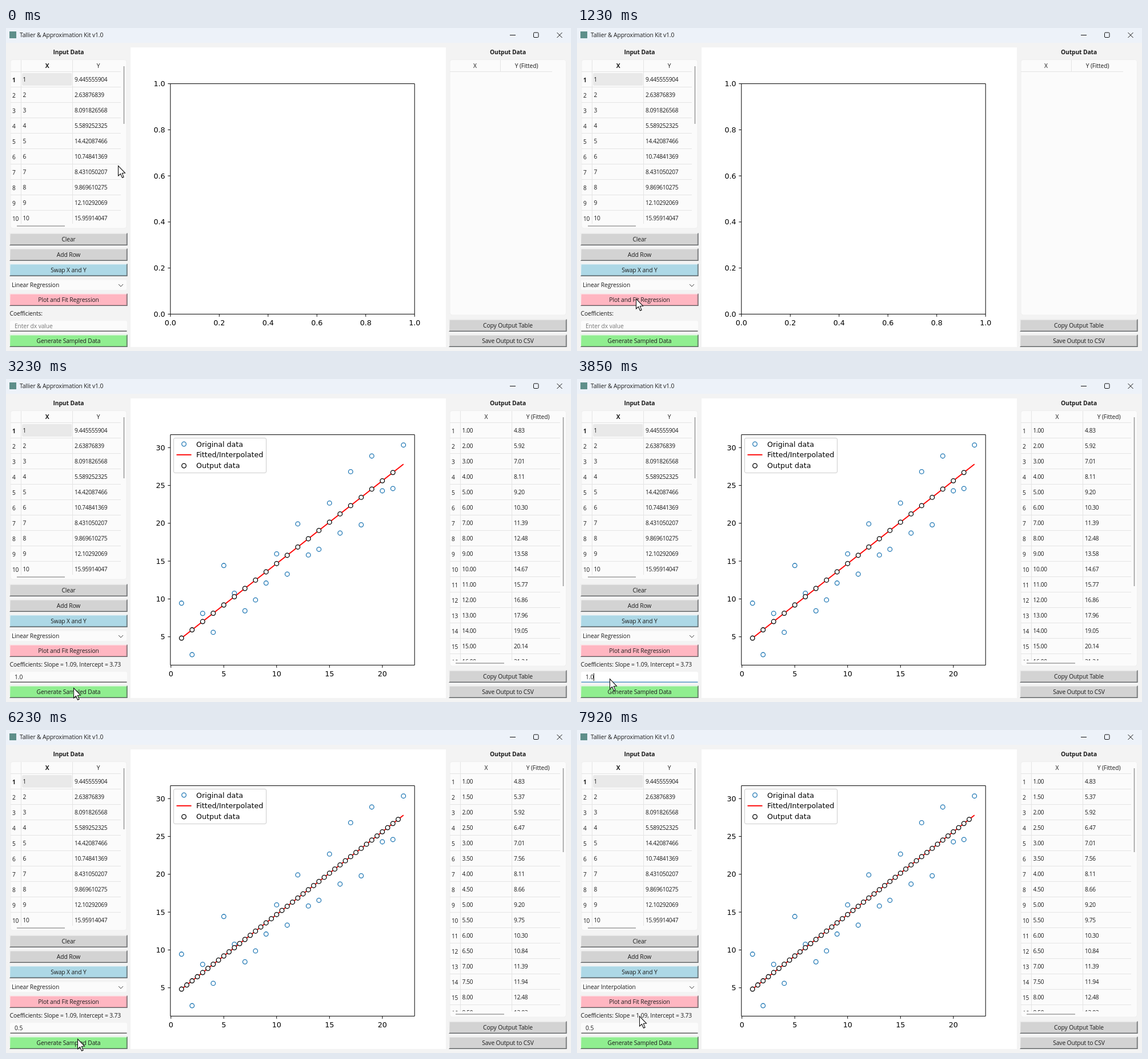
These frames come from a looping animation (989x566 px, 8 s). An HTML page with a canvas:

```html
<!DOCTYPE html>
<html lang="en">
<head>
<meta charset="utf-8">
<title>Curve fitting demo</title>
<style>
html, body { margin: 0; width: 100%; height: 100%; overflow: hidden; background: #f3f3f3; }
canvas { display: block; }
</style>
</head>
<body>
<canvas id="stage" width="989" height="566"></canvas>
<script>
const ctx = document.getElementById('stage').getContext('2d');
const LOOP = 8000, STEP = 1000 / 13;
const UI = '"Open Sans", "Noto Sans", sans-serif';
const PLOT = '"DejaVu Sans", sans-serif';

const samples = ['9.445555904', '2.63876839', '8.091826568', '5.589252325', '14.42087466',
  '10.74841369', '8.431050207', '9.869610275', '12.10292069', '15.95914047',
  13.28, 19.92, 15.81, 16.56, 22.67, 18.71, 26.82, 19.8, 28.89, 24.29, 24.59, 30.34];
const fit = x => 4.8255 + 1.0942 * (x - 1);

// Pointer keys: step, x, y
const path = [
  [1, 196, 241], [7, 102, 479], [8, 102, 479], [11, 104, 508], [14, 104, 463], [16, 103, 474],
  [22, 103, 474], [23, 115, 473], [27, 115, 473], [31, 177, 558], [32, 178, 559], [37, 118, 541],
  [43, 118, 541], [48, 58, 526], [50, 57, 525], [52, -25, 522], [72, -25, 502], [73, -9, 500],
  [77, 125, 541], [84, 125, 541], [87, 97, 456], [88, 97, 456], [89, 97, 441], [95, 97, 441],
  [97, 101, 478], [101, 101, 478], [102, 109, 501]
];

function pointerAt(n) {
  if (n <= path[0][0]) return path[0].slice(1);
  for (let i = 1; i < path.length; i++) {
    const [a, ax, ay] = path[i - 1], [b, bx, by] = path[i];
    if (n <= b) {
      const k = (n - a) / (b - a);
      return [ax + (bx - ax) * k, ay + (by - ay) * k];
    }
  }
  return path[path.length - 1].slice(1);
}

function box(x, y, w, h, fill, r = 0, stroke = null) {
  ctx.beginPath();
  ctx.roundRect(x, y, w, h, r);
  if (fill) { ctx.fillStyle = fill; ctx.fill(); }
  if (stroke) { ctx.strokeStyle = stroke; ctx.lineWidth = 1; ctx.stroke(); }
}

function line(points, color, width = 1) {
  ctx.beginPath();
  points.forEach(([x, y]) => ctx.lineTo(x, y));
  ctx.strokeStyle = color;
  ctx.lineWidth = width;
  ctx.stroke();
}

function write(str, x, y, font, align, color, spacing) {
  ctx.font = font;
  ctx.textAlign = align;
  ctx.fillStyle = color;
  ctx.letterSpacing = spacing;
  ctx.fillText(str, x, y);
}
const label = (str, x, y, align = 'left', weight = 400, color = '#1b1b1b') =>
  write(str, x, y + 3.8, `${weight} 10.3px ${UI}`, align, color, '-0.12px');
const cell = (str, x, y, weight = 400) =>
  write(str, x, y + 3.8, `${weight} 10.2px ${UI}`, 'left', '#1b1b1b', '-0.35px');
const plotText = (str, x, y, align = 'left') =>
  write(str, x, y + 4.6, `12.65px ${PLOT}`, align, '#000', '0px');

function clipped(x, y, w, h, draw) {
  ctx.save();
  ctx.beginPath();
  ctx.rect(x, y, w, h);
  ctx.clip();
  draw();
  ctx.restore();
}

function button(str, x, y, color, down = false) {
  const w = 206, h = 21.5, dark = '#5c6063', light = '#fafafa';
  box(x, y, w, h, color);
  const r = x + w - 0.5, b = y + h - 0.5;
  line([[x + 1, b - 1], [r - 1, b - 1], [r - 1, y + 1]], 'rgba(0,0,0,.22)');
  line([[x, b], [x + 0.5, y + 0.5], [r, y + 0.5]], down ? dark : light);
  line([[x, b], [r, b], [r, y]], down ? light : dark, 1.2);
  const d = down ? 1 : 0;
  label(str, x + w / 2 + d, y + 10.7 + d, 'center');
}

function titleBar() {
  box(0, 0, 989, 26, '#edf2f9');
  box(6, 6, 12, 12, '#5e8f8a');
  label('Tallier & Approximation Kit v1.0', 24, 12);
  line([[882, 12.5], [892, 12.5]], '#111');
  box(923.5, 8, 8.5, 8.5, null, 1.5, '#111');
  line([[964.5, 8], [973.5, 17]], '#111');
  line([[973.5, 8], [964.5, 17]], '#111');
}

// Grid with optional row header; rows are [x, y] text pairs
function table({ x, w, bottom, viewW, viewH, cols, rows, active }) {
  const grid = '#e4e4e4';
  box(x, 55.5, w, bottom - 55.5, '#fbfbfb', 4, '#efefef');
  clipped(x, 56, viewW, viewH - 56, () => {
    line([[x, 76.5], [x + viewW, 76.5]], grid);
    cols.forEach(c => line([[c, 56], [c, rows.length ? viewH : 76.5]], grid));
    if (active) box(28, 79, 87.5, 22, '#e9e9e9', 2);
    rows.forEach(([a, b], i) => {
      const y = 90 + 27 * i;
      line([[x, y + 13.5], [x + viewW, y + 13.5]], grid);
      cell(i + 1, x + 3, y + 1, active && i === 0 ? 700 : 400);
      cell(a, cols[0] + 3, y);
      cell(b, cols[1] + 3.5, y);
    });
  });
}

const thumb = (x1, y1, x2, y2) => line([[x1, y1], [x2, y2]], '#9b9b9b', 1.6);

function inputTable(n) {
  label('Input Data', 109.5, 42, 'center', 700);
  const rows = samples.slice(0, 10).map((v, i) => [i + 1, v]);
  table({ x: 8, w: 203, bottom: 351, viewW: 193, viewH: 343, cols: [26.5, 116.5], rows, active: true });
  label('X', 72, 66, 'center', 700);
  label('Y', 161.5, 66, 'center');
  thumb(206.5, 67, 206.5, n < 23 ? 168 : 174);
  thumb(19, 347, 103, 347);
}

function outputTable(dx) {
  label('Output Data', 878.5, 42, 'center', 700);
  const rows = [];
  for (let i = 0; dx && i < 16; i++) {
    const x = 1 + i * dx;
    rows.push([x.toFixed(2), fit(x).toFixed(2)]);
  }
  table({
    x: 777, w: 203.5, bottom: 503, viewW: dx ? 193 : 179, viewH: 493,
    cols: dx ? [795.5, 885.5] : [865.5], rows
  });
  label('X', dx ? 840.5 : 821, 66, 'center');
  label('Y (Fitted)', dx ? 931 : 911, 66, 'center');
  if (dx) {
    thumb(975.5, 67, 975.5, dx === 1 ? 363 : 214);
    thumb(787, 498, 872, 498);
  }
}

const L = 287.8, R = 715.2, T = 97.6, B = 501.4;
const px = x => L + (x + 0.05) * (R - L) / 23.1;
const py = y => B - (y - 1.254) * 13.26;

function ring(x, y, color, fill) {
  ctx.beginPath();
  ctx.arc(x, y, 3.8, 0, 7);
  if (fill) { ctx.fillStyle = fill; ctx.fill(); }
  ctx.strokeStyle = color;
  ctx.lineWidth = 1.3;
  ctx.stroke();
}

function xTick(x, str) {
  line([[x, B], [x, B + 4.5]], '#000');
  plotText(str, x, 516, 'center');
}

function yTick(y, str) {
  line([[L - 4.5, y], [L, y]], '#000');
  plotText(str, 278.5, y, 'right');
}

function plot(fitted, dx) {
  box(218, 34, 552, 525, '#fff');
  if (!fitted) {
    for (let i = 0; i <= 5; i++) {
      const str = (i / 5).toFixed(1);
      xTick(L + (R - L) * i / 5, str);
      yTick(B - (B - T) * i / 5, str);
    }
  } else {
    for (let v = 0; v <= 20; v += 5) xTick(px(v), v);
    for (let v = 5; v <= 30; v += 5) yTick(py(v), v);
    samples.forEach((v, i) => ring(px(i + 1), py(+v), '#1f77b4'));
    line([[px(1), py(fit(1))], [px(22), py(fit(22))]], '#f00', 1.9);
    if (dx) for (let x = 1; x < 22; x += dx) ring(px(x), py(fit(x)), '#000', '#fff');
  }
  box(L, T, R - L, B - T, null, 0, '#000');
  if (fitted) legend(dx);
}

function legend(dx) {
  box(293.5, 103.5, 162, dx ? 61 : 42.5, 'rgba(255,255,255,.8)', 2.5, '#ccc');
  ring(311.5, 114, '#1f77b4');
  plotText('Original data', 333, 114);
  line([[298.5, 132.8], [324.5, 132.8]], '#f00', 1.9);
  plotText('Fitted/Interpolated', 333, 132.8);
  if (dx) {
    ring(311.5, 152, '#000', '#fff');
    plotText('Output data', 333, 151.7);
  }
}

function inputField(n) {
  const focus = n >= 47 && n < 79;
  const str = n < 23 ? '' : n < 63 ? '1.0' : n < 66 ? '' : n < 67 ? '0' : '0.5';
  const selected = n >= 57 && n < 63;
  box(7, 513, 205, 18.5, focus ? '#fff' : '#fbfbfb', 3);
  line([[7.5, 531.2], [211.5, 531.2]], focus ? '#2f7fb8' : '#3c3c3c', 1.3);
  if (n < 23) return label('Enter dx value', 15, 522.5, 'left', 400, '#777');
  if (selected) box(15, 515, 15, 15, '#0078d4');
  label(str, 15, 522.3, 'left', 400, selected ? '#fff' : '#1b1b1b');
  if (focus && !selected) {
    const x = Math.round(15 + ctx.measureText(str).width) + 0.5;
    line([[x, 515.5], [x, 529]], '#111');
  }
}

function popup(n) {
  if (n < 91 || n >= 103) return;
  const full = 67, open = n === 91 ? 9 : n === 92 ? 40 : full;
  const items = ['Linear Regression', 'Polynomial Regression', 'Linear Interpolation', 'Step Interpolation'];
  const current = n < 97 ? 0 : n < 102 ? 1 : 2;
  clipped(5, 459, 209, full + 1, () => {
    const top = 459 + open - full;
    box(7.5, top + 0.5, 204, full - 1, '#fdfdfd', 4, '#6e6e6e');
    items.forEach((item, i) => {
      const y = top + 1.5 + 16 * i;
      if (i === current) {
        box(9, y, 201, 15.5, '#f1f1f1', 3);
        box(9, y + 3.5, 2, 9, '#2f7fb8', 1);
      }
      label(item, 15, y + 8);
    });
  });
}

function controls(n) {
  button('Clear', 6.5, 359.5, '#d3d3d3');
  button('Add Row', 6.5, 386.5, '#d3d3d3');
  button('Swap X and Y', 6.5, 413.3, '#add8e6');
  box(7, 441.5, 204, 17.5, '#fbfbfb', 3);
  label(n < 103 ? 'Linear Regression' : 'Linear Interpolation', 10, 450.5);
  line([[197, 449], [201, 453], [205, 449]], '#444');
  button('Plot and Fit Regression', 6.5, 465.5, '#ffb6c1', n === 20);
  label('Coefficients:' + (n < 23 ? '' : ' Slope = 1.09, Intercept = 3.73'), 6.5, 500);
  inputField(n);
  button('Generate Sampled Data', 6.5, 537.5, '#90ee90', n === 39 || n === 79);
  button('Copy Output Table', 775.5, 510.5, '#d3d3d3');
  button('Save Output to CSV', 775.5, 537.5, '#d3d3d3');
  popup(n);
}

function pointer([x, y]) {
  const shape = [[0, 0], [0, 17.5], [4, 14], [7, 20.8], [9.6, 19.6], [6.8, 13], [12, 12.6]];
  ctx.beginPath();
  shape.forEach(([dx, dy]) => ctx.lineTo(x + 0.5 + dx, y + 0.5 + dy));
  ctx.closePath();
  ctx.fillStyle = '#fff';
  ctx.fill();
  ctx.strokeStyle = '#111';
  ctx.lineWidth = 1.1;
  ctx.stroke();
}

function draw(t) {
  const n = Math.floor((t + 5) / STEP) % 104;
  const dx = n < 41 ? 0 : n < 81 ? 1 : 0.5;
  box(0, 0, 989, 566, '#f3f3f3');
  titleBar();
  inputTable(n);
  plot(n >= 23, dx);
  outputTable(dx);
  controls(n);
  pointer(pointerAt(n));
}

const start = performance.now();
function tick() {
  draw((performance.now() - start) % LOOP);
  requestAnimationFrame(tick);
}
tick();
</script>
</body>
</html>
```
